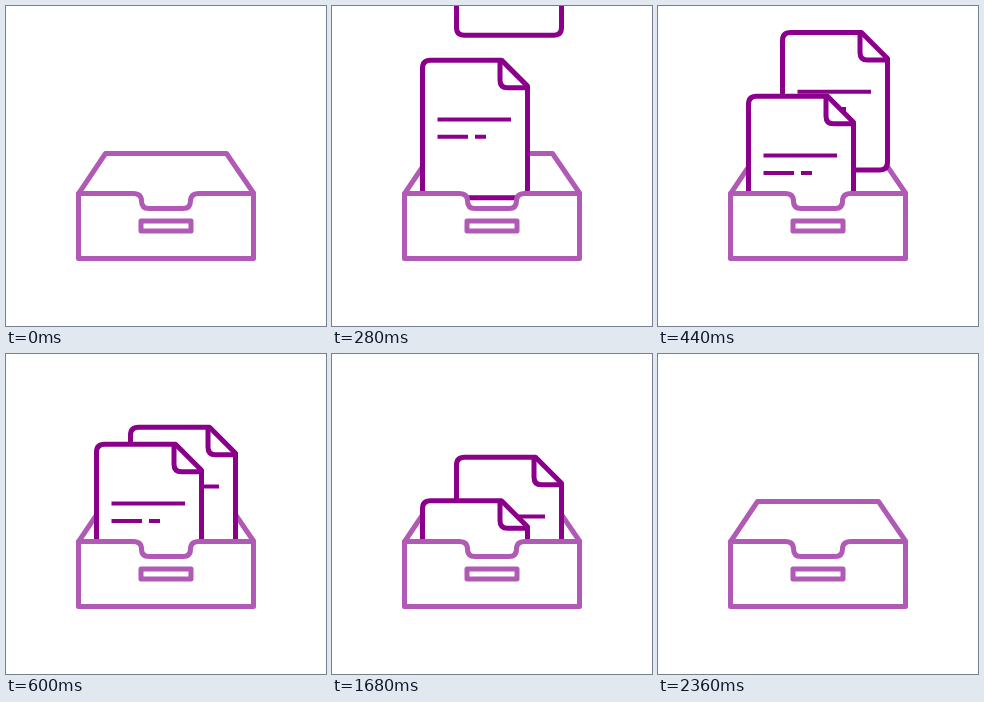
Recreate the animation shown at these times as an HTML page. Size 320 by 320 pixels, loop 2.4 s.

```html
<!DOCTYPE html>
<html lang="en">
<head>
<meta charset="utf-8">
<title>Documents in a drawer</title>
<style>
  html, body { margin: 0; width: 100%; height: 100%; overflow: hidden; background: #fff; }
  svg { display: block; width: 100vw; height: 100vh; }
  .drawer { fill: none; stroke: #b05ab5; stroke-width: 5; stroke-linejoin: round; stroke-linecap: round; }
  .sheet { fill: #fff; stroke: #8b008b; stroke-width: 5; stroke-linejoin: round; }
  .text { stroke-width: 4; }
</style>
</head>
<body>
<svg viewBox="0 0 320 320">
  <defs>
    <clipPath id="aboveFront">
      <path d="M0 0H320V187.5H193Q184.5 187.5 184.5 195T177 202.5H143Q135.5 202.5 135.5 195T127 187.5H0Z"/>
    </clipPath>
    <g id="doc" class="sheet">
      <path d="M8 0H79L105 26V129.500Q105 137.500 97 137.500H8Q0 137.500 0 129.500V8Q0 0 8 0Z"/>
      <path d="M77.500 0V20Q77.500 27.500 85 27.500H105" fill="none"/>
      <path class="text" d="M15 59.300H88.500M15 76.700H45.500M52.500 76.700H63.500"/>
    </g>
  </defs>
  <path class="drawer" d="M73 187L99.500 147.500H220.500L247.500 187"/>
  <g clip-path="url(#aboveFront)">
    <use id="back" href="#doc"/>
    <use id="front" href="#doc"/>
  </g>
  <g class="drawer">
    <path d="M72.500 187.500H127Q135.500 187.500 135.500 195Q135.500 202.500 143 202.500H177Q184.500 202.500 184.500 195Q184.500 187.500 193 187.500H247.500V252.500H72.500Z"/>
    <rect x="135" y="215" width="50" height="10"/>
  </g>
</svg>
<script>
  const LOOP = 2400, STEP = 40;
  const docs = [
    { id: 'back', x: 124.5, y: 73.3, landed: 573, leaves: 1575 },
    { id: 'front', x: 90.5, y: 90.3, landed: 396, leaves: 1533 }
  ].map(doc => ({ ...doc, node: document.getElementById(doc.id) }));

  // Sine-eased distance from rest, given the milliseconds to or from rest.
  const travel = ms => 146 * (1 - Math.cos(Math.min(Math.PI, Math.max(0, ms) * 0.0062)));

  function draw(now) {
    const t = Math.floor(now % LOOP / STEP) * STEP;
    for (const { node, x, y, landed, leaves } of docs) {
      const top = y - travel(landed - t) + travel(t - leaves);
      node.setAttribute('transform', `translate(${x} ${top})`);
    }
  }

  const start = performance.now();
  function tick() {
    draw(performance.now() - start);
    requestAnimationFrame(tick);
  }
  tick();
</script>
</body>
</html>
```
